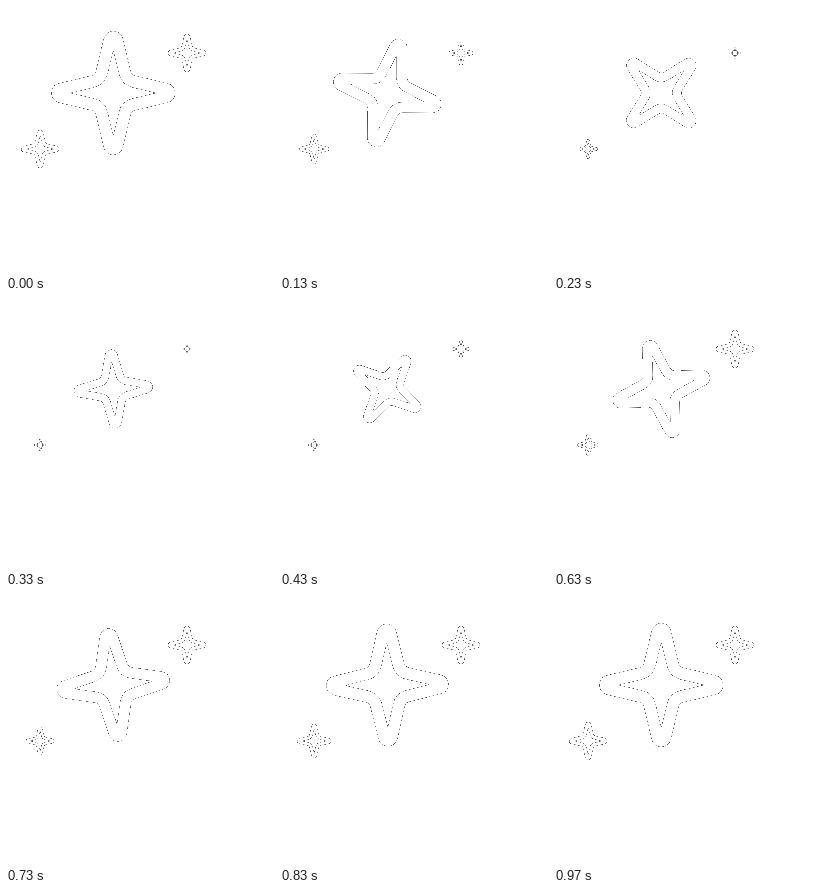
An HTML page with a canvas that plays this animation: 268x268 px, repeating every 1000 ms.

```html
<!DOCTYPE html>
<html lang="en">
<head>
<meta charset="utf-8">
<title>Sparkles</title>
<style>
  html, body { margin: 0; height: 100%; overflow: hidden; background: #fff; }
  canvas { display: block; width: 100%; height: 100%; image-rendering: pixelated; }
</style>
</head>
<body>
<canvas id="stage" width="268" height="268"></canvas>
<script>
const SIZE = 268, LOOP = 1000, FPS = 30, SMALL = 0.306;
const ctx = document.getElementById('stage').getContext('2d', { willReadFrequently: true });
const smooth = s => s * s * (3 - 2 * s);

// Eased value between [frame, value] keys, held outside them
function track(frame, keys) {
  for (let i = 1; i < keys.length; i++) {
    const [a, from] = keys[i - 1], [b, to] = keys[i];
    if (frame < b) return from + (to - from) * smooth((frame - a) / (b - a));
  }
  return keys[keys.length - 1][1];
}

// Half turn with a quick start and a long, soft landing
function turn(frame) {
  const x = Math.min(1, frame / 27);
  let lo = 0, hi = 1;
  for (let i = 0; i < 30; i++) {
    const s = (lo + hi) / 2;
    if (1.02 * s * (1 - s) + s ** 3 < x) lo = s; else hi = s;
  }
  return Math.PI * smooth(lo);
}

// Four-pointed band: round outer tips, sharp inner tips
function star(x, y, scale, angle = 0) {
  const cap = 76.5 * Math.PI / 180;
  ctx.setTransform(scale, 0, 0, scale, x, y);
  ctx.rotate(angle);
  ctx.beginPath();
  for (let i = 0; i < 4; i++) {
    ctx.arc(52, 0, 10, -cap, cap);
    ctx.arcTo(18.3, 18.3, 0, 94.7, 5.7);
    ctx.rotate(Math.PI / 2);
  }
  ctx.closePath();
  ctx.moveTo(42.3, 0);
  for (let i = 0; i < 4; i++) {
    ctx.arcTo(8.2, 8.2, 0, 42.3, 18);
    ctx.rotate(Math.PI / 2);
    ctx.lineTo(42.3, 0);
  }
  ctx.closePath();
  ctx.fill('evenodd');
}

// White shapes with a hard cut-out: rim pixels at least half covered stay, shaded grey
function shadeRim() {
  const image = ctx.getImageData(0, 0, SIZE, SIZE), d = image.data;
  for (let i = 0; i < d.length; i += 4) {
    const alpha = d[i + 3];
    d[i] = d[i + 1] = d[i + 2] = alpha < 128 ? 255 : alpha * alpha / 255;
    d[i + 3] = 255;
  }
  ctx.putImageData(image, 0, 0);
}

function draw(now) {
  const frame = Math.floor((now % LOOP) * FPS / 1000 + 0.15) % FPS;
  ctx.setTransform(1, 0, 0, 1, 0, 0);
  ctx.clearRect(0, 0, SIZE, SIZE);
  star(107.3, 87, track(frame, [[0, 1], [11.5, 0.62], [26.5, 1]]), turn(frame));
  star(181, 47, SMALL * track(frame, [[0, 1], [8, 0.3], [10, 0.3], [19, 1]]));
  star(34.2, 143, SMALL * track(frame, [[0, 1], [11, 0.3], [29.3, 1]]));
  shadeRim();
}

const start = performance.now();
function tick() {
  draw(performance.now() - start);
  requestAnimationFrame(tick);
}
tick();
</script>
</body>
</html>
```
